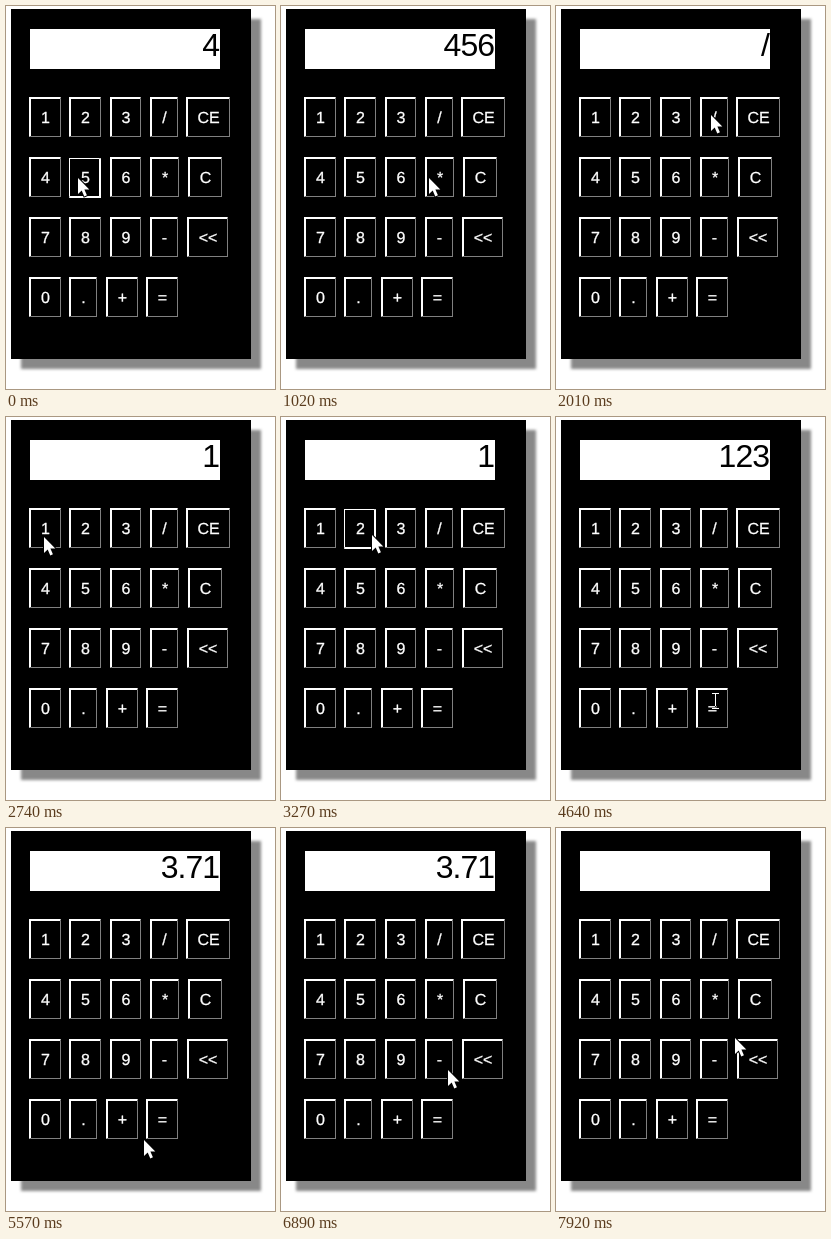
Write an HTML page that moves like this. It is 269x383 px and loops after 8 s.

```html
<!DOCTYPE html>
<html lang="en">
<head>
<meta charset="utf-8">
<title>Calculator</title>
<style>
  html, body { margin: 0; width: 100%; height: 100%; overflow: hidden; background: #fff; }
  svg { display: block; width: 269px; height: 383px; }
  text { font-family: "Liberation Sans", Arial, sans-serif; }
  .label {
    font-size: 16px; fill: #fff; stroke: #fff; stroke-width: .3;
    text-anchor: middle; text-rendering: geometricPrecision;
  }
  #readout { font-size: 32px; letter-spacing: -1px; text-anchor: end; }
  #arrow { fill: #fff; stroke: #000; stroke-width: 2; paint-order: stroke; }
  #beam { fill: none; stroke: #fff; mix-blend-mode: difference; }
</style>
</head>
<body>
<svg viewBox="0 0 269 383">
  <defs>
    <filter id="blur" x="-10%" y="-10%" width="120%" height="120%">
      <feGaussianBlur stdDeviation="1.6"/>
    </filter>
  </defs>
  <rect width="269" height="383" fill="#fff"/>
  <rect x="15" y="13" width="240" height="350" fill="#888" filter="url(#blur)"/>
  <rect x="5" y="3" width="240" height="350"/>
  <rect x="24" y="23" width="190" height="40" fill="#fff"/>
  <text id="readout" x="213" y="50"></text>
  <g id="keys"></g>
  <path id="arrow" d="M0 0V16L3.7 12.6L6.3 18.4L8.9 17.3L6.4 11.6H11.3Z"/>
  <path id="beam" d="M-3.5 -7.5H3.5M-3.5 7.5H3.5M0 -7V7"/>
</svg>
<script>
const NS = "http://www.w3.org/2000/svg";
const LOOP = 8000;
const STEP = 140;        // pointer refresh and key press, ms
const MAX_TRAVEL = 880;  // longest move between two stops, ms
const KEY_HEIGHT = 40;
const $ = id => document.getElementById(id);

const rows = ["1 2 3 / CE", "4 5 6 * C", "7 8 9 - <<", "0 . + ="];

// Where the pointer goes; a key is released at the given time.
const stops = [
  { time: 140, x: 72, y: 172, key: "5" },
  { time: 640, x: 115, y: 171, key: "6" },
  { time: 1280, x: 154, y: 172, key: "*" },
  { time: 2010, x: 155, y: 109, key: "/" },
  { time: 2730, x: 38, y: 120, key: "1" },
  { time: 3410, x: 91, y: 118, key: "2" },
  { time: 3955, x: 120, y: 117, key: "3" },
  { time: 4640, x: 159.5, y: 284, beam: true },
  { time: 5040, x: 157, y: 293, key: "=" },
  { time: 5570, x: 138, y: 312 },
  { time: 7465, x: 195, y: 172, key: "C" },
  { time: 7920, x: 179, y: 210 }
];

function add(parent, tag, attrs) {
  const node = document.createElementNS(NS, tag);
  for (const name in attrs) node.setAttribute(name, attrs[name]);
  return parent.appendChild(node);
}

// Mitred frame: one thickness for top and left, another for bottom and right
function addFrame(parent, w, y, near, far, nearFill, farFill) {
  const h = KEY_HEIGHT;
  const frame = add(parent, "g", { transform: `translate(0 ${y})` });
  const inner = `${w - far} ${near}`;
  add(frame, "path", { fill: nearFill, d: `M0 ${h}V0H${w}L${inner}H${near}V${h - far}Z` });
  add(frame, "path", { fill: farFill, d: `M${w} 0V${h}H0L${near} ${h - far}H${w - far}V${near}Z` });
  return frame;
}

function addRow(labels, row) {
  let left = 23;
  return labels.split(" ").map(label => {
    const x = Math.round(left);
    const group = add($("keys"), "g", { transform: `translate(${x} ${91 + 60 * row})` });
    const text = add(group, "text", { class: "label", y: 26 });
    text.textContent = label;
    const right = left + 24 + text.getComputedTextLength() * 15 / 16;
    const w = Math.floor(right - .1) - x;
    text.setAttribute("x", w / 2 + .5);
    left = right + 8;
    return {
      label,
      raised: addFrame(group, w, 0, 2, 1, "#fff", "#808080"),
      sunken: addFrame(group, w, 1, 1, 2, "#fff", "#fff")
    };
  });
}

const keys = rows.flatMap(addRow);

const show = (node, on) => node.setAttribute("visibility", on ? "visible" : "hidden");
const ease = p => (1 - Math.cos(Math.PI * p)) / 2;

function readoutAt(time) {
  let shown = "4", operand = 0;
  for (const { time: released, key } of stops) {
    if (released > time) break;
    if (!key) continue;
    if (key === "C") shown = "";
    else if (key === "=") shown = (operand / shown).toFixed(2);
    else if (/\d/.test(key)) shown = isNaN(shown) ? key : shown + key;
    else {
      if (!isNaN(shown)) operand = +shown;
      shown = key;
    }
  }
  return shown;
}

function pointerAt(time) {
  const next = stops.find(s => s.time > time) || stops.at(-1);
  const prev = stops.findLast(s => s.time <= time) || next;
  const arrive = next.time - (next.key ? STEP : 0);
  const leave = Math.max(prev.time, arrive - MAX_TRAVEL);
  const span = arrive - leave;
  const count = Math.max(1, Math.round(span / STEP));
  const raw = span > 0 ? (time - leave) / span : 1;
  const p = Math.floor(Math.min(1, Math.max(0, raw)) * count) / count;
  return {
    x: prev.x + (next.x - prev.x) * ease(p),
    y: prev.y + (next.y - prev.y) * ease(p),
    beam: Boolean(prev.beam) && p === 0,
    pressed: time >= arrive && time < next.time ? next.key : null
  };
}

function draw(time) {
  const { x, y, beam, pressed } = pointerAt(time);
  $("readout").textContent = readoutAt(time);
  for (const key of keys) {
    show(key.raised, key.label !== pressed);
    show(key.sunken, key.label === pressed);
  }
  const place = beam ? [x, y] : [Math.round(x), Math.round(y)];
  for (const id of ["arrow", "beam"]) $(id).setAttribute("transform", `translate(${place})`);
  show($("arrow"), !beam);
  show($("beam"), beam);
}

const begin = performance.now();
function tick() {
  draw((performance.now() - begin) % LOOP);
  requestAnimationFrame(tick);
}
tick();
</script>
</body>
</html>
```
